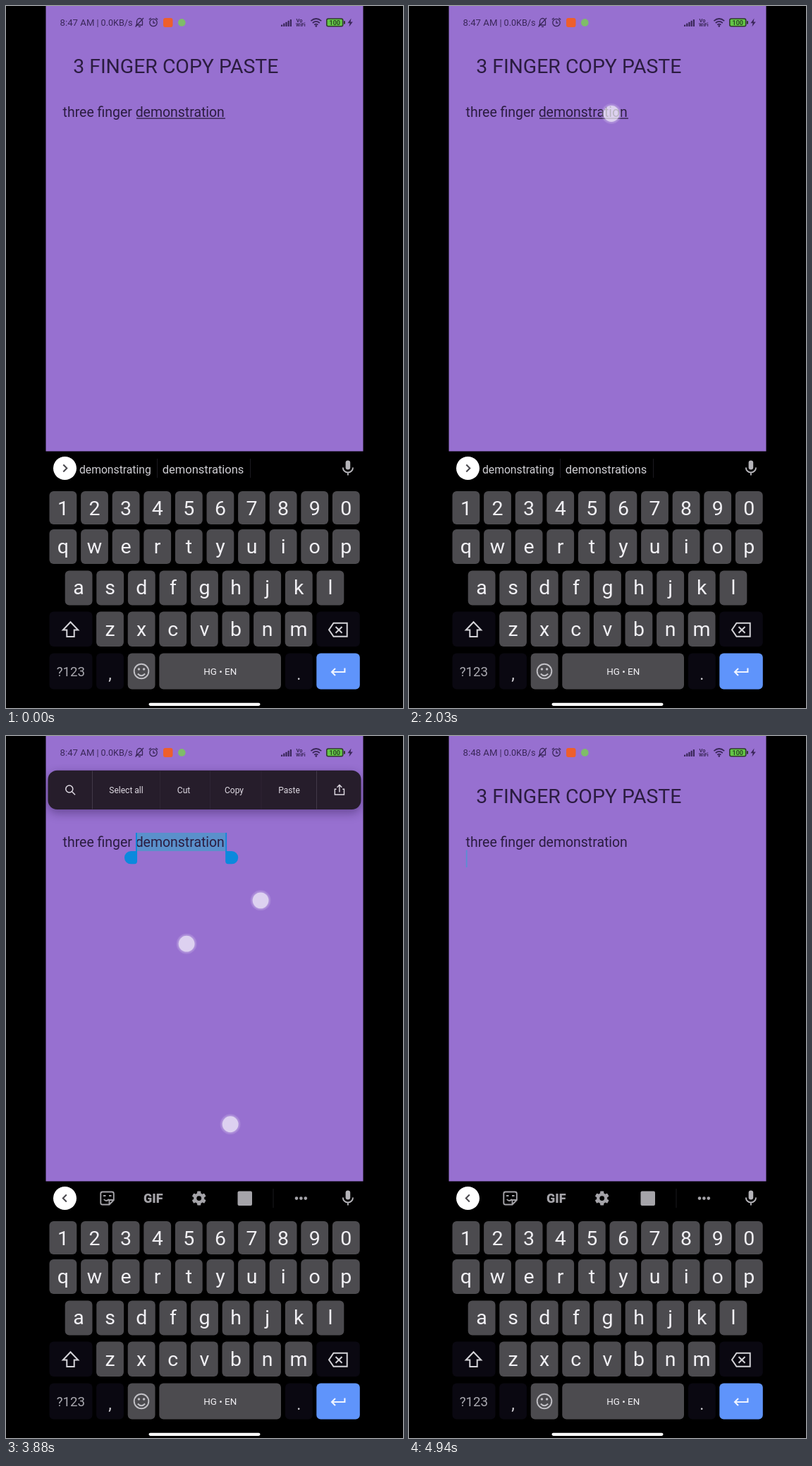
Recreate the animation shown at these times as an HTML page with a canvas. Size 563 by 994 pixels, loop 5000 ms.

```html
<!DOCTYPE html>
<html lang="en">
<head>
<meta charset="utf-8">
<title>Three finger copy</title>
<style>
  html, body { margin: 0; width: 100%; height: 100%; overflow: hidden; background: #000; }
  canvas { display: block; width: 100vw; height: 100vh; }
</style>
</head>
<body>
<canvas id="stage" width="563" height="994"></canvas>
<script>
const ctx = document.getElementById('stage').getContext('2d');
const LOOP = 5000;
const INK = '#2b1c40', STATUS = '#3a2759', KEY = '#4c4b4f', DARK_KEY = '#0a0811';
const LETTER = '#f1f0f4', ICON = '#a5a4a9', BLUE = '#0b89dd';

// Moments of the gesture sequence
const T = { press: 1790, select: 2285, release: 2530, menu: 2620,
            land: 3730, drag: 3835, copy: 4150, lift: 4240, newline: 4600 };

const clamp = v => Math.max(0, Math.min(1, v));
const ramp = (t, from, to) => clamp((t - from) / (to - from));
const pulse = (t, on, off, fade) => ramp(t, on, on + fade) * (1 - ramp(t, off, off + fade));

function text(str, x, y, size, color, align = 'left', weight = 400) {
  ctx.font = `${weight} ${size}px Roboto, sans-serif`;
  ctx.textAlign = align;
  ctx.fillStyle = color;
  ctx.fillText(str, x, y);
}

function rect(x, y, w, h, color, radius = 0) {
  ctx.fillStyle = color;
  ctx.beginPath();
  ctx.roundRect(x, y, w, h, radius);
  ctx.fill();
}

function disc(x, y, r, color) {
  ctx.fillStyle = color;
  ctx.beginPath();
  ctx.arc(x, y, r, 0, Math.PI * 2);
  ctx.fill();
}

function line(path, color, width = 2) {
  ctx.strokeStyle = color;
  ctx.lineWidth = width;
  ctx.stroke(new Path2D(path));
}

function shape(path, color) {
  ctx.fillStyle = color;
  ctx.fill(new Path2D(path));
}

function statusBar(t) {
  text(t < T.newline ? '8:47 AM' : '8:48 AM', 76.6, 28, 13.2, STATUS);
  text('|', 128.6, 27.5, 12.6, STATUS);
  text('0.0KB/s', 134.6, 28, 12.6, STATUS);

  // muted bell, alarm clock
  line('M184 27H194M185.5 26.5V22a4 4.5 0 0 1 8 0V26.5M188 29.3H191M183.5 29.5L195 17', STATUS, 1.3);
  line('M203.8 23.5a5.2 5.2 0 1 0 10.4 0a5.2 5.2 0 1 0-10.4 0M209 20.5V24H211.5M202.8 19.3L205.6 17M215.2 19.3L212.4 17', STATUS, 1.3);
  rect(223, 17, 13.5, 13, '#ee5f2c', 3);
  disc(249.3, 23.4, 5.3, '#7fbd68');

  for (let i = 0; i < 5; i++) rect(390 + i * 3.2, 26.5 - i * 1.9, 2.2, 2.5 + i * 1.9, STATUS, .6);
  text('Vo', 411.5, 22.5, 7.5, STATUS, 'left', 700);
  text('WiFi', 411, 29.3, 7, STATUS, 'left', 700);
  line('M432.4 21.2Q439.8 14.8 447.2 21.2M434.8 24Q439.8 19.8 444.8 24M437.2 26.7Q439.8 24.6 442.4 26.7', STATUS, 1.7);
  disc(439.8, 28.4, 1.3, STATUS);

  rect(454, 17.2, 24.5, 12.3, '#303a2d', 3);
  rect(455.6, 18.8, 21.3, 9.1, '#63c646', 1.5);
  rect(479, 21, 2, 4.8, '#303a2d', 1);
  text('100', 466.2, 26.8, 9, '#24371f', 'center', 500);
  shape('M489.5 17.5L484.5 24.3H487.6L486.5 29.3L491.8 22.4H488.6Z', STATUS);
}

function keyRow(chars, x, y, h, baseline) {
  [...chars].forEach((char, i) => {
    const left = x + i * 44.6;
    rect(left, y, 38.8, h, KEY, 6);
    text(char, left + 19.4, baseline, 28.5, LETTER, 'center');
  });
}

function keyboard() {
  keyRow('1234567890', 61.5, 687, 47, 721);
  keyRow('qwertyuiop', 61.5, 741, 49, 774.5);
  keyRow('asdfghjkl', 83.7, 799.5, 49, 833);
  keyRow('zxcvbnm', 128.1, 857.5, 49.5, 891.5);

  for (const [x, y, w] of [[61.5, 857.5, 61], [440.3, 857.5, 61.5], [61.5, 916.5, 61],
                           [128.1, 916.5, 38.8], [396, 916.5, 38.8]])
    rect(x, y, w, y < 900 ? 49.5 : 51, DARK_KEY, 6);
  rect(172.7, 916.5, 38.8, 51, KEY, 6);
  rect(217.3, 916.5, 172.7, 51, KEY, 6);
  rect(440.3, 916.5, 61.5, 51, '#5f94fb', 6);

  line('M91.5 872.3L80.8 883.5H86.3V893H96.7V883.5H102.2Z', '#d4d3d8');
  line('M464.5 873.8H483.7V892.8H464.5L458 883.3ZM467.5 879L476.5 887.8M476.5 879L467.5 887.8', '#d4d3d8');
  text('?123', 91.8, 949, 18.7, '#a9a8af', 'center');
  text(',', 147.5, 954, 23, '#d4d3d8', 'center');
  text('.', 415.4, 954, 23, '#d4d3d8', 'center');
  text('HG • EN', 303.7, 947, 13.4, LETTER, 'center');

  line('M181.7 942a10.3 10.3 0 1 0 20.6 0a10.3 10.3 0 1 0-20.6 0M186.8 945.5Q192 951 197.2 945.5', '#c1c0c5', 1.9);
  disc(188.4, 939, 1.7, '#c1c0c5');
  disc(195.6, 939, 1.7, '#c1c0c5');
  line('M480.4 937.5V943H462.5M467 938L462 943L467 948', '#eef3ff', 2.1);
  rect(202.5, 986.7, 158, 4.3, '#fff', 2.15);
}

function suggestions() {
  text('demonstrating', 104, 661.5, 15.7, '#cfced3');
  text('demonstrations', 221.7, 661.5, 16.5, '#cfced3');
  rect(214, 641, 1, 27, '#1b1a1f');
  rect(346, 641, 1, 27, '#1b1a1f');
}

function shortcuts() {
  line('M136.8 645.5H150.2Q152.8 645.5 152.8 648V657L146.5 663.5H136.8Q134.3 663.5 134.3 661V648Q134.3 645.5 136.8 645.5ZM152.8 657H146.5V663.5M138.8 656Q142 660 146 656M138 651H141.5M146 651H149.5', ICON, 1.9);
  text('GIF', 208.7, 661, 18, ICON, 'center', 900);

  ctx.save();
  ctx.translate(273.7, 654.6);
  for (let i = 0; i < 6; i++) {
    rect(-2.6, -10, 5.2, 6, ICON, 1);
    ctx.rotate(Math.PI / 3);
  }
  disc(0, 0, 7.6, ICON);
  disc(0, 0, 3.4, '#000');
  ctx.restore();

  rect(328.5, 644.5, 20.5, 20.5, ICON, 2);
  rect(378.5, 641, 1, 27, '#1b1a1f');
  for (const x of [412, 418.4, 424.8]) disc(x, 654.6, 2.3, ICON);
}

function suggestionStrip(t) {
  const open = t >= T.menu;
  disc(83.5, 654.5, 16.5, '#fff');
  line(open ? 'M85.8 649.5L80.8 654.5L85.8 659.5' : 'M81.3 649.5L86.3 654.5L81.3 659.5', '#49484d', 2);
  if (open) shortcuts();
  else if (t < T.select) suggestions();
  rect(481.6, 643.5, 6.6, 13, '#b5b4b9', 3.3);
  line('M477.8 653.5a7.1 7 0 0 0 14.2 0M484.9 660.5V664.5', '#b5b4b9', 1.9);
}

function note(t) {
  const selected = t >= T.select && t < T.copy;
  text('3 FINGER COPY PASTE', 95.2, 95, 28.4, INK);
  if (selected) rect(185, 137, 126.5, 26, '#5a90cb');
  text('three finger demonstration', 80.6, 157, 19.45, INK);
  if (t < T.select) rect(185, 158.6, 126, 1.2, INK);
  if (t >= T.newline) rect(80.8, 161.5, 1.8, 24.5, '#5a8fd2');
}

function handles(alpha) {
  ctx.globalAlpha = alpha;
  rect(184, 137, 1.8, 27, BLUE);
  rect(311.3, 137, 1.8, 27, BLUE);
  rect(168, 163, 18, 18.3, BLUE, [9, 0, 4, 9]);
  rect(311.2, 163, 18, 18.3, BLUE, [0, 9, 9, 4]);
  ctx.globalAlpha = 1;
}

function menu(alpha) {
  if (!alpha) return;
  const scale = .9 + .1 * alpha;
  ctx.save();
  ctx.globalAlpha = alpha;
  ctx.translate(281.6, 78);
  ctx.scale(scale, scale);
  ctx.translate(-281.6, -78);

  ctx.shadowColor = 'rgba(35, 15, 65, .4)';
  ctx.shadowBlur = 14;
  ctx.shadowOffsetY = 5;
  rect(59.5, 48.8, 444, 55.2, '#261d2b', 13);
  ctx.shadowColor = 'transparent';

  for (const x of [122, 218, 289, 361.5, 440])
    rect(x, 49.5, 1, 54, x === 122 || x === 440 ? '#413848' : '#2e2534');
  for (const [label, x] of [['Select all', 170.5], ['Cut', 252], ['Copy', 323.5], ['Paste', 401.5]])
    text(label, x, 81, 12, '#dfdae3', 'center');
  line('M84.8 75a5 5 0 1 0 10 0a5 5 0 1 0-10 0M93.6 78.8L98 83.2', '#dfdae3', 1.5);
  line('M468.5 75.2H466.3V83H479.5V75.2H477.3M472.9 79.5V69.5M469.5 72.7L472.9 69.3L476.3 72.7', '#dfdae3', 1.4);
  ctx.restore();
}

function touch(x, y, alpha) {
  if (!alpha) return;
  ctx.globalAlpha = alpha;
  disc(x, y, 14.5, 'rgba(255, 255, 255, .13)');
  disc(x, y, 13, 'rgba(255, 255, 255, .12)');
  disc(x, y, 11.4, 'rgba(255, 255, 255, .58)');
  ctx.globalAlpha = 1;
}

function pinch(t) {
  const alpha = ramp(t, T.land, T.land + 60) * (1 - ramp(t, T.copy, T.lift));
  const progress = (Math.max(t, T.drag) - 3880) / 300;
  for (const [x, y, dx, dy] of [[256, 294, 27, 63], [361, 232.5, 23.5, 111.5], [318, 550, 44.5, -74.5]])
    touch(x + dx * progress, y + dy * progress, alpha);
}

function draw(t) {
  rect(0, 0, 563, 994, '#000');
  rect(56.5, 0, 450, 630.5, '#9770d0');
  statusBar(t);
  note(t);
  if (t >= T.menu && t < 4330) handles(ramp(t, T.menu, T.menu + 60) * (1 - ramp(t, 4270, 4330)));
  menu(ramp(t, T.menu, T.menu + 150) * (1 - ramp(t, 4160, 4310)));
  touch(287, 152.5, pulse(t, T.press, T.release, 60));
  pinch(t);
  suggestionStrip(t);
  keyboard();
}

function frame() {
  draw(performance.now() % LOOP);
  requestAnimationFrame(frame);
}
frame();
</script>
</body>
</html>
```
